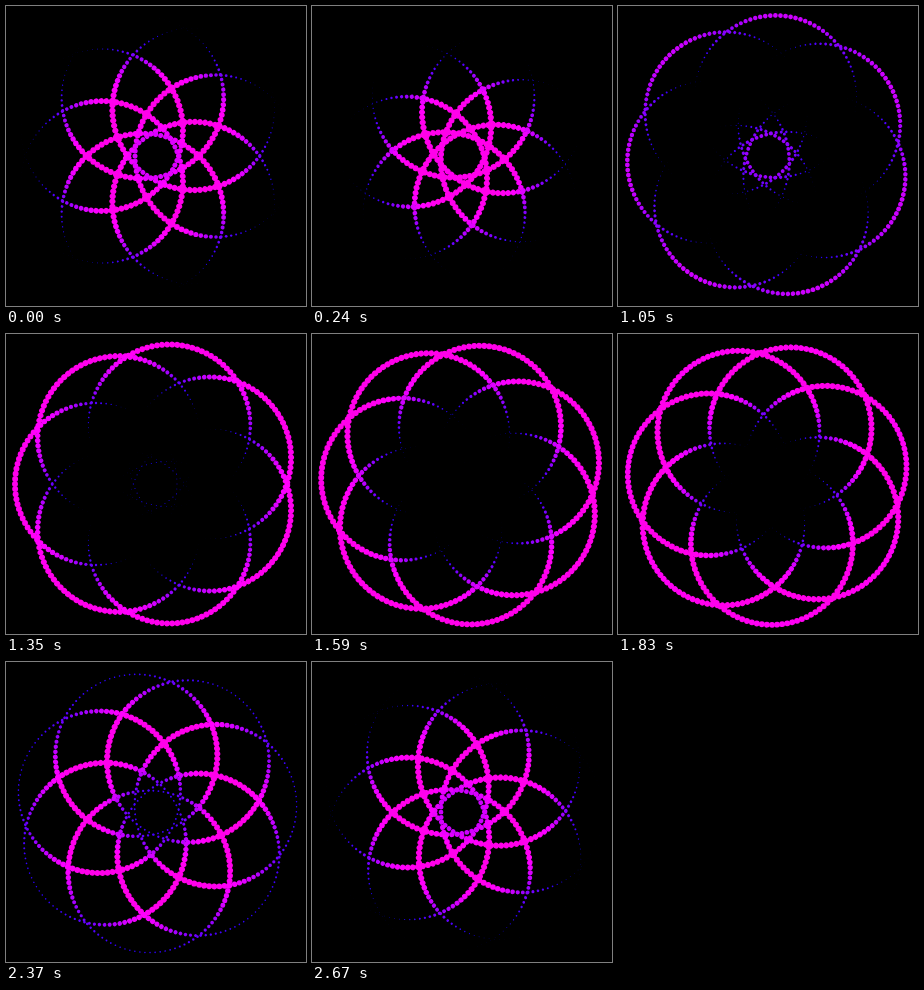
An HTML page with a canvas for the animation above (2.7 s loop, 300 by 300 pixels).

```html
<!DOCTYPE html>
<html lang="en">
<head>
<meta charset="utf-8">
<title>Pulsing rosette</title>
<style>
  html, body { margin: 0; width: 100%; height: 100%; overflow: hidden; background: #000; }
  canvas { display: block; width: 300px; height: 300px; }
</style>
</head>
<body>
<canvas id="stage" width="300" height="300"></canvas>
<script>
const ctx = document.getElementById('stage').getContext('2d');
const TAU = Math.PI * 2;
const LOOP = 2700, STEP = 30;
const RINGS = 7, DOTS = 100;
const OFFSET = 60, RADIUS = 81;         // ring centre distance and ring radius
const CREST = 55, WAVE = 200, DOT = 3;  // inward wave and largest dot radius

const smooth = v => v * v * (3 - 2 * v);

function draw(time) {
  const p = Math.floor(time % LOOP / STEP) * STEP / LOOP;
  ctx.setTransform(1, 0, 0, 1, 0, 0);
  ctx.fillStyle = '#000';
  ctx.fillRect(0, 0, 300, 300);
  ctx.translate(150, 150);
  ctx.rotate(p * TAU / RINGS);

  for (let ring = 0; ring < RINGS; ring++) {
    for (let i = 0; i < DOTS; i++) {
      const a = i / DOTS * TAU;
      const x = OFFSET + RADIUS * Math.cos(a);
      const y = RADIUS * Math.sin(a);
      const phase = (Math.hypot(x, y) - CREST) / WAVE + p;
      const level = smooth(0.5 + 0.5 * Math.cos(TAU * phase));
      ctx.fillStyle = `hsl(${240 + 65 * level ** 1.3}, 100%, 50%)`;
      ctx.beginPath();
      ctx.arc(x, y, DOT * level, 0, TAU);
      ctx.fill();
    }
    ctx.rotate(TAU / RINGS);
  }
}

const start = performance.now();
function tick() {
  draw(performance.now() - start);
  requestAnimationFrame(tick);
}
tick();
</script>
</body>
</html>
```
